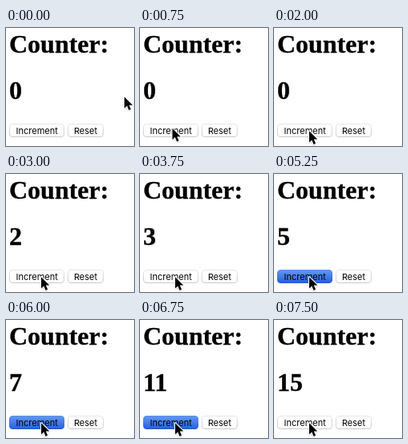
An HTML page that plays this animation: 160x148 px, repeating every 8000 ms.

```html
<!DOCTYPE html>
<html lang="en">
<head>
<meta charset="utf-8">
<title>Counter</title>
<style>
  html, body { margin: 0; width: 100%; height: 100%; overflow: hidden; background: #fff; }
  svg { display: block; }
  .big { font: bold 32px "Liberation Serif", serif; stroke: #000; stroke-width: 0.35; }
  .label { font: 11px Inter, sans-serif; text-anchor: middle; }
</style>
</head>
<body>
<svg width="160" height="148" viewBox="0 0 160 148">
  <defs>
    <linearGradient id="blue" x2="0" y2="1">
      <stop offset="0" stop-color="#6398f1"/>
      <stop offset="1" stop-color="#2661de"/>
    </linearGradient>
    <linearGradient id="edge" x2="0" y2="1">
      <stop offset="0" stop-color="#e6e6e6"/>
      <stop offset="1" stop-color="#cacaca"/>
    </linearGradient>
    <linearGradient id="blueEdge" x2="0" y2="1">
      <stop offset="0" stop-color="#5a8fee"/>
      <stop offset="1" stop-color="#2456c8"/>
    </linearGradient>
    <filter id="soft" x="-50%" y="-50%" width="200%" height="200%">
      <feGaussianBlur stdDeviation="0.8"/>
    </filter>
    <path id="arrow" d="M0 0V14.2L3.3 11.1L5.6 16.6L8.1 15.5L5.8 10.2H10.3Z"/>
  </defs>
  <rect width="160" height="148" fill="#fff"/>
  <text class="big" x="4" y="30.6">Counter:</text>
  <text class="big" x="4" y="88.6" id="count">0</text>
  <rect id="button" x="4.5" y="120.5" width="68" height="16" rx="3.5"/>
  <text class="label" x="38.7" y="133">Increment</text>
  <rect x="77.5" y="120.5" width="44" height="16" rx="3.5" fill="#fff" stroke="url(#edge)"/>
  <text class="label" x="99.5" y="133">Reset</text>
  <g id="cursor">
    <use href="#arrow" y="1.2" opacity="0.4" filter="url(#soft)"/>
    <use href="#arrow" stroke="#fff" stroke-width="2" stroke-linejoin="round"/>
    <use href="#arrow"/>
  </g>
</svg>
<script>
  const LOOP = 8000, STEP = 250, HOLD = 150;
  const $ = id => document.getElementById(id);

  // Pointer swoops in, one point per step, then settles on the button.
  const swoop = [[148, 86.5], [85, 132], [43.5, 132], [40.5, 126], [41, 128]];
  const rest = [44, 129.3];

  // Clicking speeds up: first release, gap between releases, clicks.
  const bursts = [
    { start: 2155, gap: 740, clicks: 4 },
    { start: 4925, gap: 400, clicks: 4 },
    { start: 6380, gap: 150, clicks: 5 },
    { start: 7200, gap: 200, clicks: 2 }
  ];

  function clicksAt(t) {
    let count = 0, pressed = false;
    for (const { start, gap, clicks } of bursts) {
      const hold = Math.min(HOLD, gap * 0.57);
      for (let i = 0; i < clicks; i++) {
        const release = start + i * gap;
        if (t >= release) count++;
        else if (t >= release - hold) pressed = true;
      }
    }
    return { count, pressed };
  }

  function render(time) {
    const step = Math.floor(time / STEP);
    const { count, pressed } = clicksAt(step * STEP);
    const at = step < 8 ? swoop[Math.min(step, swoop.length - 1)] : rest;
    $("count").textContent = count;
    $("button").setAttribute("fill", pressed ? "url(#blue)" : "#fff");
    $("button").setAttribute("stroke", pressed ? "url(#blueEdge)" : "url(#edge)");
    $("cursor").setAttribute("transform", `translate(${at})`);
  }

  function tick() {
    render(performance.now() % LOOP);
    requestAnimationFrame(tick);
  }
  tick();
</script>
</body>
</html>
```
